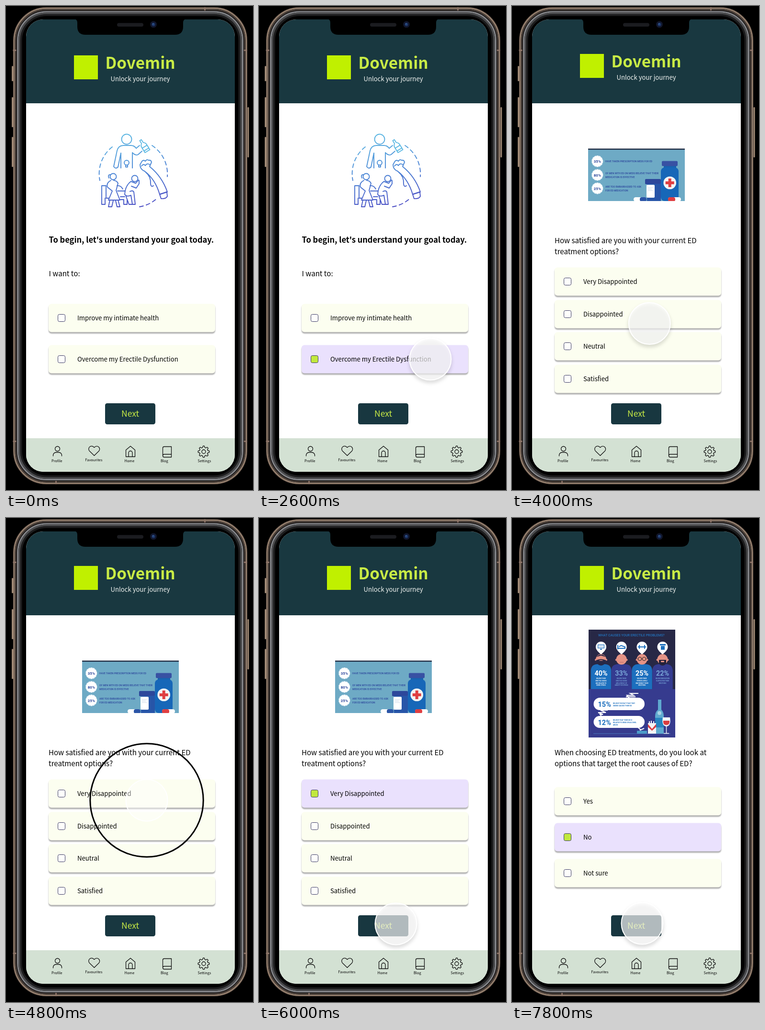
Recreate the animation shown at these times as an HTML page. Size 516 px wide and 1010 px high, loop 8000 ms.

```html
<!DOCTYPE html>
<html lang="en">
<head>
<meta charset="utf-8">
<title>Health questionnaire</title>
<style>
html, body { margin: 0; width: 100%; height: 100%; overflow: hidden; background: #000; }
svg { display: block; width: 100%; height: 100%; }
text { font-family: "Noto Sans CJK JP", "Noto Sans CJK SC", "Noto Sans CJK", "Noto Sans", sans-serif; }
.narrow text { font-family: Roboto, "Liberation Sans", sans-serif; }
.card rect:first-child { fill: #fcfef0; filter: drop-shadow(0 3.5px 1.3px rgba(0,0,0,.33)); }
.card .box { fill: #fefefb; stroke: #3b3967; }
.card.on rect:first-child { fill: #eae1fd; }
.card.on .box { fill: #c1e83e; }
.line { fill: none; stroke-linecap: round; stroke-linejoin: round; }
</style>
</head>
<body>
<svg id="stage" viewBox="0 0 516 1010" xmlns="http://www.w3.org/2000/svg"></svg>
<script>
const LOOP = 8000;

const rect = (x, y, w, h, fill, r = 0, extra = '') =>
  `<rect x="${x}" y="${y}" width="${w}" height="${h}" rx="${r}" fill="${fill}" ${extra}/>`;
const circle = (x, y, r, fill, extra = '') =>
  `<circle cx="${x}" cy="${y}" r="${r}" fill="${fill}" ${extra}/>`;
const path = (d, fill = 'none', extra = '') => `<path d="${d}" fill="${fill}" ${extra}/>`;
const text = (x, y, size, str, fill = '#000', extra = '') =>
  `<text x="${x}" y="${y}" font-size="${size}" fill="${fill}" ${extra}>${str}</text>`;
const lines = (x, y, size, step, rows, fill, extra) =>
  rows.map((row, i) => text(x, y + i * step, size, row, fill, extra)).join('');
const mid = 'text-anchor="middle"';
const bold = 'font-weight="700"';
const midBold = mid + ' ' + bold;

function phone() {
  const ring = (inset, color, width, fill = 'none') =>
    rect(16.5 + inset, 4 + inset, 486 - 2 * inset, 992.5 - 2 * inset, fill, 68 - inset,
      `stroke="${color}" stroke-width="${width}"`);
  const gold = '#a48d78';
  const buttons = [[12, 125, 32], [12, 190, 63], [12, 273, 63], [504.5, 211, 105]]
    .map(([x, y, h]) => rect(x, y, 3, h, gold, 1.5)).join('');
  const bands = [[414, 2.5, 3, 7], [103, 991, 3, 7], [14.5, 91, 7, 3], [14.5, 907, 7, 3], [497, 91, 7, 3], [497, 907, 7, 3]]
    .map(([x, y, w, h]) => rect(x, y, w, h, '#8d7468')).join('');
  return buttons + ring(0, '#7d6a5d', 3, '#0b0a0a') + ring(1, gold, 1.5) + ring(3.5, '#4b403a', 3) +
    ring(8, '#85868a', 3) + ring(11.5, '#4a4b4d', 4) + ring(15, '#1c1c1d', 4, '#000') + bands;
}

function notch() {
  return path('M143 27Q149 28 149 35V43Q149 60 166 60H353Q370 60 370 43V35Q370 28 376 27Z', '#000') +
    rect(232, 35.5, 55, 7.5, '#1b1c20', 3.75) +
    circle(308, 38.5, 7, '#11162b') + circle(308, 38.5, 3.5, '#1d3769') + circle(307.3, 37.5, 1.2, '#4068a0');
}

function header() {
  return rect(42, 28, 436, 175, '#193840') + `<g id="brand">` +
    rect(142, 100, 50, 50, '#c0f000') +
    text(207.5, 128, 33.3, 'Dovemin', '#c9ec45', bold) +
    text(218.5, 153.7, 13.2, 'Unlock your journey', '#f2f5f2') + '</g>';
}

function gearPath() {
  const points = [];
  for (let i = 0; i < 96; i++) {
    const a = i / 96 * 2 * Math.PI;
    const r = 10.3 + 1.5 * Math.tanh(3 * Math.cos(8 * a));
    points.push((413 + r * Math.sin(a)).toFixed(2) + ' ' + (930 - r * Math.cos(a)).toFixed(2));
  }
  return 'M' + points.join('L') + 'Z';
}

function footer() {
  const icons = circle(107.5, 924, 5, 'none') +
    path('M98.5 939v-1.5a6 6 0 0 1 6-6h6a6 6 0 0 1 6 6v1.5') +
    path('M193.7 920.2a6 6 0 0 0-8.2 0l-1.2 1.2-1.2-1.2a6 6 0 0 0-8.6 8.5l9.8 9.5 9.7-9.5a6 6 0 0 0-.3-8.5z') +
    path('M250.5 926.5L260 918.5L269.5 926.5V940.5H250.5ZM256 940.5V932.5a4 4 0 0 1 8 0V940.5') +
    path('M327.5 938.5a3 3 0 0 1 3-3H345.5M330.5 919.5H345.5V941.5H330.5a3 3 0 0 1-3-3V922.5a3 3 0 0 1 3-3Z') +
    path(gearPath()) + circle(413, 930, 4, 'none');
  const labels = [[95, 952, 'Profile'], [165.5, 950, 'Favourites'], [247.5, 952, 'Home'], [323, 952, 'Blog'], [400.5, 952, 'Settings']]
    .map(([x, y, s]) => text(x, y, 7.4, s)).join('');
  return rect(42, 902, 436, 70, '#d3e1d3') + `<g class="line" stroke="#111" stroke-width="1.3">${icons}</g>` + labels;
}

const card = (id, cy, label) => `<g class="card" id="${id}">` +
  rect(89, cy - 29.5, 348, 59, '#fcfef0', 6) + rect(108.5, cy - 7.5, 15, 15, '#fff', 3, 'class="box"') +
  text(149, cy + 4.7, 13.2, label) + '</g>';

const button = rect(207, 829, 105, 44, '#183740', 4.5) + text(241, 857, 17.5, 'Next', '#c9ec45');

function goalArt() {
  const ring = [
    'M222 294A71 71 0 0 0 196 364', 'M305 291A71 71 0 0 1 337 356', 'M279 419A71 71 0 0 0 317 400'
  ].map(d => path(d, 'none', 'stroke-dasharray="8 6.5"')).join('');
  const drinker = circle(252, 278, 10.5, 'none') + circle(252, 327, 5, 'none') +
    path('M250 332v4h4v-4M240 307V338M264 307V338') +
    path('M240 307L234 336Q229 341 225 335L232 302Q235 291 245 291H261Q268 291 272 297L279 291M284 303L276 310Q271 313 264 306') +
    path('M-2-13h4v7q4 3 4 7v13h-12v-13q0-4 4-7zM-6 3h12v7h-12z', 'none', 'transform="translate(288 291) rotate(-32)"');
  const forearm = path('M280 331L284 324Q288 320 291 324Q294 319 298 322Q303 321 304 326L300 335Q326 356 337 388L321 393Q312 362 290 345Q280 341 280 331Z') +
    path('M283 334Q288 328 291 333Q295 327 300 331M292 347Q303 356 302 371Q303 379 308 375') +
    path('M321 393L336 388L337 397Q334 403 324 402Z');
  const couple = circle(224, 356, 6.5, 'none') + circle(269, 360, 6.5, 'none') +
    path('M218 352q-6 0-3 7M219 364Q209 369 212 378L222 386L214 405H238L230 385L234 370Q231 364 225 364M217 405L214 419H221L224 406M229 406L232 419H238L234 405') +
    path('M200 375H209V401H215M200 375V414H207V401M232 375Q240 374 244 382M239 398H248M239 404H246V414H253V405') +
    path('M261 366Q249 375 248 393Q251 399 261 395L264 414H270L267 388Q265 384 259 387M261 366L271 370L277 363M262 376L272 380L278 371V364M251 398L257 414H263') +
    path('M233 386H249');
  return `<g class="line" stroke="url(#ink)" stroke-width="1.9">${ring + drinker + forearm + couple}</g>`;
}

function pillsArt() {
  const blue = '#2b459b';
  const stats = [
    [324, '35%', ['HAVE TAKEN PRESCRIPTION MEDS FOR ED'], 326],
    [352.5, '80%', ['OF MEN WITH ED ON MEDS BELIEVE THAT THEIR', 'MEDICATION IS EFFECTIVE'], 350.5],
    [380.5, '25%', ['ARE TOO EMBARRASSED TO ASK', 'FOR ED MEDICATION'], 378.5]
  ].map(([y, pct, rows, ty]) => circle(178.3, y, 11, '#fff', 'stroke="#f4f8fc" stroke-width="2" stroke-dasharray="4 1"') +
    text(178.3, y + 3, 8, pct, blue, midBold) +
    lines(195, ty, 5, 8, rows, blue, 'font-weight="500"')).join('');
  const bottles = rect(278, 361, 33, 11, '#2d479b', 2) + rect(282, 371, 29, 36, '#2755a8') +
    rect(281, 373, 17, 27, '#fff', 2) + path('M284 379h10M284 382h8M284 385h10', 'none', 'stroke="#cbd7e8"') +
    rect(317, 331, 26, 10, '#1862af') + rect(313, 323.5, 33, 10.5, '#3851a3', 2) +
    rect(311, 337, 37, 70, '#1767b8', 8) + circle(329.7, 369, 13.3, '#f3f4f4') +
    path('M329.7 360v18M320.7 369h18', 'none', 'stroke="#df3f42" stroke-width="6"');
  const pills = rect(254, 399, 27, 9, '#fff', 4.5) + rect(267, 399, 14, 9, '#2b55a7', 4) +
    rect(326, 399, 27, 9, '#fff', 4.5) + rect(326, 399, 15, 9, '#df3f42', 4);
  return `<g class="narrow" clip-path="url(#pillsClip)">` + rect(159, 298, 202, 109, '#6eaac5') +
    stats + bottles + pills + rect(159, 297.5, 202, 2.5, '#223047') + '</g>';
}

function causesArt() {
  const navy = '#272846', blue = '#1c6fbe', skin = '#e59385';
  const people = [
    [186, '40%', ['BELIEVE THEIR', 'ERECTILE ISSUES', 'ARE RELATED TO', 'WORK STRESS']],
    [228.7, '33%', ['BELIEVE THEIR', 'ERECTILE ISSUES', 'ARE A RESULT OF', 'ANXIETY OR STRESS']],
    [271.5, '25%', ['BELIEVE THEIR', 'FITNESS LEVELS', 'MAY IMPACT THEIR', 'ERECTIONS']],
    [314.5, '22%', ['BELIEVE MEDICATION', 'IS AFFECTING THEIR', 'ERECTIONS']]
  ].map(([x, pct, rows], i) => {
    const ink = i % 2 ? '#79a6d8' : '#fff';
    return path(`M${x - 21.3} 357V319Q${x - 21} 305 ${x - 7} 305H${x + 7}Q${x + 21} 305 ${x + 21.3} 319V357Z`, i % 2 ? '#343b90' : blue) +
      path(`M${x - 8} 277L${x} 285L${x + 8} 277Z`, '#fff') + circle(x, 269, 11, '#fff') +
      circle(x, 295, 11, skin) + circle(x - 11, 296, 2, skin) + circle(x + 11, 296, 2, skin) +
      text(x, 329, 14.3, pct, ink, midBold) + lines(x, 336, 2.9, 4.8, rows, ink, midBold);
  }).join('');
  const faces = path('M175 297Q186 292 197 297Q195 307 186 308Q177 307 175 297', navy) +
    path('M181 298q5-3 10 0z', skin) + path('M176 290q10-10 20 0l-10-3z', navy) +
    path('M225 301h8', 'none', 'stroke="#b76963"') +
    path('M262 294h19', 'none', 'stroke="#222"') + circle(267, 294, 3.7, skin, 'stroke="#222"') + circle(276, 294, 3.7, skin, 'stroke="#222"') +
    path('M307 296H322V304Q314.5 312 307 304Z', '#25223a') + rect(311, 298, 7, 3, skin, 1);
  const symbols = rect(179.5, 264.5, 13, 7, '#cfe1f2', 0, `stroke="${blue}"`) + rect(184, 273, 4, 2, blue) +
    path('M221 265v9M221 272h15v-3l-8-3-5 3', 'none', `stroke="${blue}" stroke-width="2"`) +
    path('M263 269h17M266 265v8M277 265v8', 'none', `stroke="${blue}" stroke-width="2"`) +
    rect(309, 263, 12, 3, blue) + rect(311, 267, 8, 8, blue);
  const bubbles = rect(170.5, 375, 106.5, 26, '#fff', 13) + rect(170.5, 413, 106.5, 25, '#fff', 12.5) +
    path('M245 376L240 370H254L247 366H264M238 373H258M200 401H185L196 406H180L190 410H184L188 415M262 436l7 6', 'none', 'stroke="#fff" stroke-width="2"') +
    text(179.5, 394, 14.5, '15%', blue, bold) + text(179.5, 431.5, 14.5, '12%', blue, bold) +
    lines(211, 388, 3.3, 5, ['BELIEVE THE FACT THAT THEY', 'SMOKE CAUSES THEIR ED'], blue, bold) +
    lines(211, 423, 3.3, 5, ['BELIEVE THAT THEIR ED IS', 'RELATED TO DRUG OR ALCOHOL', 'ABUSE'], blue, bold);
  const table = path('M170 450H331', 'none', 'stroke="#4a79bd"') + rect(261, 444, 21, 6, '#4b9bc9') + path('M267 443l9-4', 'none', 'stroke="#fff" stroke-width="2"') +
    path('M305 379H312V400Q317 405 317 413V450H299V413Q299 405 305 400Z', '#5fa9cf') + rect(299, 417, 18, 20, '#2683bf') + circle(308, 407, 4, '#a8d4e6') +
    rect(284, 428, 17, 22, '#f2f4f6') + path('M284 430L292.5 440L301 430V436L292.5 444L284 436Z', '#db3f43') + path('M287 428v-4M291 428v-5M296 428v-4', 'none', 'stroke="#fff" stroke-width="2"') +
    path('M315 416H330Q333 434 322.5 435Q312 434 315 416Z', '#f0f3f7') + path('M316 423H329Q330 432 322.5 432Q315 432 316 423Z', '#d93c3f') +
    path('M322.5 434V449M317 449.5H328', 'none', 'stroke="#f0f3f7" stroke-width="1.5"');
  return `<g class="narrow">` + rect(160, 233, 181, 225, '#363b8e') + rect(160, 233, 181, 124, navy) +
    text(180, 247, 6.9, 'WHAT CAUSES YOUR ERECTILE PROBLEMS?', '#2273bd', 'font-weight="500"') +
    people + faces + symbols + bubbles + table + '</g>';
}

const question = rows => lines(89, 494.5, 15.05, 23, rows);
const screens = [
  goalArt() + text(89.5, 494, 16.55, "To begin, let's understand your goal today.", '#000', 'font-weight="600"') +
    text(89.5, 563.5, 15.05, 'I want to:') +
    card('improve', 651, 'Improve my intimate health') + card('overcome', 737, 'Overcome my Erectile Dysfunction'),
  pillsArt() + question(['How satisfied are you with your current ED', 'treatment options?']) +
    card('veryBad', 575, 'Very Disappointed') + card('bad', 643, 'Disappointed') +
    card('neutral', 710, 'Neutral') + card('good', 778, 'Satisfied'),
  causesArt() + question(['When choosing ED treatments, do you look at', 'options that target the root causes of ED?']) +
    card('yes', 591, 'Yes') + card('no', 666, 'No') + card('unsure', 741, 'Not sure')
];

const stage = document.getElementById('stage');
stage.innerHTML = `<defs>
  <linearGradient id="ink" gradientUnits="userSpaceOnUse" x1="240" y1="266" x2="275" y2="420">
    <stop stop-color="#5db9e3"/><stop offset=".55" stop-color="#4a82d4"/><stop offset="1" stop-color="#4a4cc4"/>
  </linearGradient>
  <clipPath id="glass"><rect x="42" y="28" width="436" height="944" rx="36"/></clipPath>
  <clipPath id="pillsClip"><rect x="159" y="297" width="202" height="110"/></clipPath>
  </defs>` + phone() + '<g clip-path="url(#glass)">' + rect(42, 28, 436, 944, '#fff') + header() +
  screens.map((s, i) => `<g id="screen${i}">${s}</g>`).join('') + button + footer() + '</g>' + notch() +
  circle(0, 0, 43.5, '#fcfcfc', 'id="cursor" stroke="#fff" stroke-width="2"') +
  circle(0, 0, 44, 'none', 'id="ripple" stroke="#000" stroke-width="3"');

const el = id => document.getElementById(id);

// Pointer stops: arrival time, departure time, x, y
const stops = [
  [900, 900, 325, 800], [1700, 2620, 358, 737], [3000, 3500, 270, 852], [4300, 5080, 294, 589],
  [5500, 6220, 286, 847], [6700, 7220, 295, 673], [7700, LOOP, 272, 846]
];
const clicks = [2060, 3050, 4660, 5670, 6860];
const CLICK_TIME = 320;
const screenStarts = [0, 3300, 6150];
const choices = { overcome: 2330, veryBad: 4960, no: 7150 };

const clamp = v => Math.max(0, Math.min(1, v));
const easeInOut = p => p < .5 ? 2 * p * p : 1 - 2 * (1 - p) ** 2;

function pointerAt(t) {
  const next = stops.findIndex(s => s[0] > t);
  if (next === 0) return stops[0].slice(2);
  if (next < 0) return stops[stops.length - 1].slice(2);
  const from = stops[next - 1], to = stops[next];
  const p = easeInOut(clamp((t - from[1]) / (to[0] - from[1])));
  return [from[2] + (to[2] - from[2]) * p, from[3] + (to[3] - from[3]) * p];
}

function render(t) {
  const current = screenStarts.filter(s => t >= s).length - 1;
  screens.forEach((_, i) => el('screen' + i).style.display = i === current ? '' : 'none');
  el('brand').setAttribute('transform', `translate(0 ${current ? 0 : 3})`);
  for (const id in choices) el(id).classList.toggle('on', t >= choices[id]);

  const [x, y] = pointerAt(t);
  const place = `translate(${x} ${y})`;
  const click = clicks.find(c => t >= c && t < c + CLICK_TIME);
  const p = click === undefined ? 0 : (t - click) / CLICK_TIME;

  const cursor = el('cursor');
  cursor.setAttribute('transform', place);
  cursor.setAttribute('fill-opacity', p ? .45 : .68);
  cursor.style.filter = p ? 'none' : 'drop-shadow(0 5px 3.5px rgba(0,0,0,.18))';
  cursor.style.opacity = clamp((t - 900) / 250);

  const ripple = el('ripple');
  ripple.setAttribute('transform', place);
  ripple.setAttribute('r', 44 + 108 * (1 - (1 - p) ** 2));
  ripple.style.opacity = p ? clamp((1 - p) * 2) : 0;
}

function frame(now) {
  render(now % LOOP);
  requestAnimationFrame(frame);
}
render(0);
requestAnimationFrame(frame);
</script>
</body>
</html>
```
